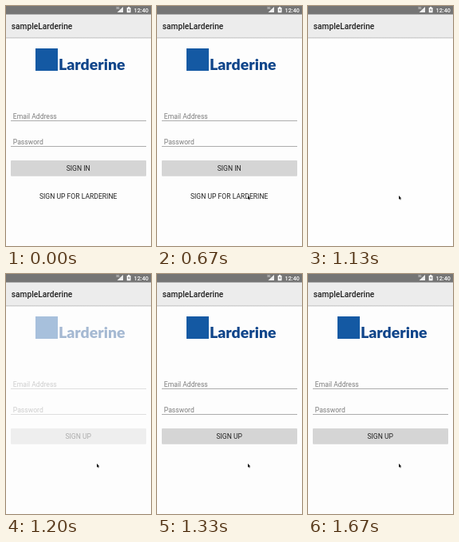
Recreate the animation shown at these times as an HTML page. Size 182x300 px, loop 1.74 s.

```html
<!DOCTYPE html>
<html lang="en">
<head>
<meta charset="utf-8">
<title>Sign in</title>
<style>
  html, body { margin: 0; width: 100%; height: 100%; overflow: hidden; background: #fefefe; }
  svg { display: block; width: 100vw; height: 100vh; }
  text { font: 8.6px Roboto, sans-serif; fill: #222; }
  .mid { text-anchor: middle; }
  .hint { fill: #7c7c7c; }
  .title { font-size: 10.2px; font-weight: 500; }
  .brand { font: 900 19.5px Lato, sans-serif; fill: #10458a; }
  .clock { font-size: 7.2px; font-weight: 500; fill: #fff; }
  .net { font-size: 3.6px; fill: #fff; }
</style>
</head>
<body>
<svg viewBox="0 0 182 300">
  <defs>
    <linearGradient id="shade" x2="0" y2="1">
      <stop stop-color="#c4c4c4"/>
      <stop offset="1" stop-color="#fdfdfd"/>
    </linearGradient>
  </defs>

  <g id="page">
    <rect y="39" width="182" height="261" fill="#fdfdfd"/>
    <rect x="37" y="53" width="28" height="28" fill="#1459a3"/>
    <text class="brand" x="66" y="80">Larderine</text>
    <text class="hint" x="8.8" y="141">Email Address</text>
    <text class="hint" x="8.8" y="173">Password</text>
    <path d="M6 143.5H176M6 175.5H176" stroke="#adadad"/>
    <rect x="6" y="193" width="170" height="19.7" rx="1" fill="#d5d5d5"/>
    <text class="mid" id="button" x="90.7" y="206">SIGN IN</text>
    <text class="mid" id="link" x="90.7" y="241">SIGN UP FOR LARDERINE</text>
  </g>

  <rect width="182" height="11" fill="#757575"/>
  <rect y="10.5" width="182" height="28.5" fill="#ececec"/>
  <rect y="39" width="182" height="2.5" fill="url(#shade)"/>
  <text class="title" x="6.8" y="28.6">sampleLarderine</text>

  <text class="net" x="138" y="3.8">3G</text>
  <path d="M147 1V8H139.5Z" fill="#eee"/>
  <path d="M151.7 2h1.4V1h2v1h1.4v6.3H151.7Z" fill="#fff"/>
  <path d="M154.4 2.8l-1.5 2.4h1v2l1.5-2.6h-1Z" fill="#757575"/>
  <text class="clock" x="160.6" y="7.5">12:40</text>

  <path id="cursor" d="M0 0V4.7L1.1 3.7 1.9 5.5 2.7 5.1 1.9 3.4H3.4Z"
        fill="#111" stroke="#fff" stroke-width=".6" paint-order="stroke"/>
</svg>
<script>
  const LOOP = 1740, STEP = 200 / 3;
  const SWITCH = 1130, FADE = 180;
  const [page, button, link, cursor] =
    ['page', 'button', 'link', 'cursor'].map(id => document.getElementById(id));
  const clamp = v => Math.max(0, Math.min(1, v));

  function draw(now) {
    const t = Math.floor((now % LOOP + 4) / STEP) * STEP;

    // The pointer glides in from the right and slows down
    const left = (1 - clamp((t - 66) / 600)) ** 2;
    cursor.setAttribute('transform', `translate(${114 + 64 * left} ${237 + 10 * left})`);
    cursor.setAttribute('visibility', t < 60 ? 'hidden' : 'visible');

    const second = t >= SWITCH;
    page.setAttribute('opacity', second ? clamp((t - SWITCH - 4) / FADE) : 1);
    button.textContent = second ? 'SIGN UP' : 'SIGN IN';
    link.setAttribute('visibility', second ? 'hidden' : 'visible');
  }

  const start = performance.now();
  function tick() {
    draw(performance.now() - start);
    requestAnimationFrame(tick);
  }
  tick();
</script>
</body>
</html>
```
